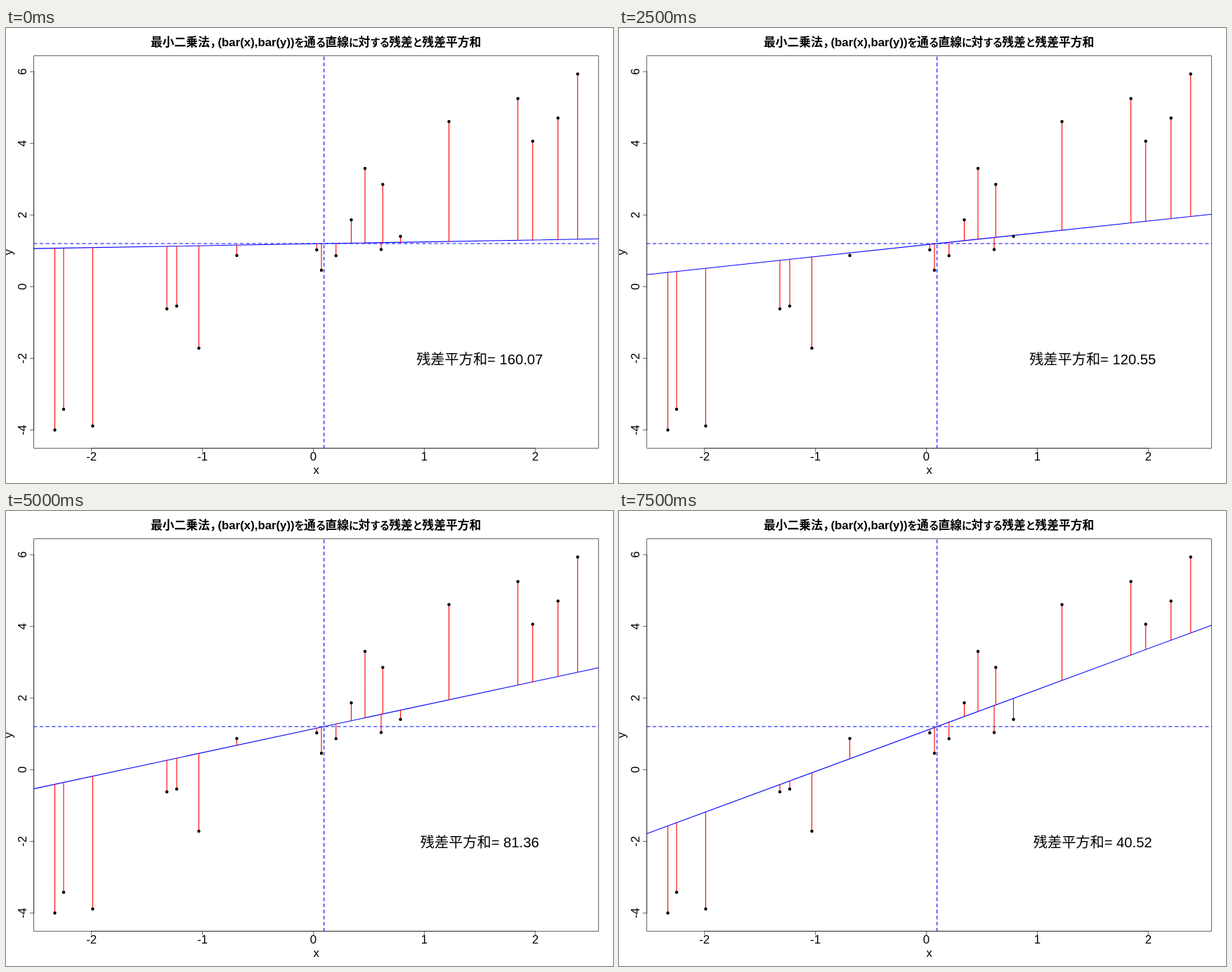
Animation of 864 by 648 pixels, one loop 8000 ms. Source, as an HTML page:

```html
<!DOCTYPE html>
<html lang="ja">
<head>
<meta charset="utf-8">
<style>
  html, body { margin: 0; width: 100%; height: 100%; overflow: hidden; background: #fff; }
  svg { display: block; }
  text { font: 16.8px "Liberation Sans", "Noto Sans CJK JP", "Noto Sans CJK", sans-serif; text-anchor: middle; }
  path, rect { fill: none; stroke-width: 1.1; stroke-linecap: round; }
  #title { font-weight: bold; text-anchor: start; }
  #title .comma { letter-spacing: -5.2px; }
  #title .kana { font-size: 14.5px; letter-spacing: -1px; }
  #sum { font-size: 20.2px; }
  .axis { stroke: #000; stroke-width: .6; }
  #means { stroke: #00f; stroke-dasharray: 4.32; }
  #fit { stroke: #00f; }
  #residuals { stroke: #f00; }
</style>
</head>
<body>
<svg width="864" height="648" viewBox="0 0 864 648">
  <text id="title" x="206" y="26"></text>
  <rect class="axis" x="39.7" y="39.7" width="803.8" height="558.7"/>
  <path id="ticks" class="axis"/>
  <g id="labels"></g>
  <path id="means"/>
  <path id="fit"/>
  <path id="residuals"/>
  <path id="points" stroke="#000" style="stroke-width:4.5"/>
  <text id="sum" x="674.2" y="478.5"></text>
</svg>
<script>
const $ = id => document.getElementById(id);
const setPath = (id, d) => $(id).setAttribute('d', d);
const LEFT = 39.7, RIGHT = 843.5, TOP = 39.7, BOTTOM = 598.4;
const UNIT_X = 157.9, UNIT_Y = 51.04;
const px = x => 437.5 + UNIT_X * x;
const py = y => 368.4 - UNIT_Y * y;

// The observed sample; the means, residuals and fitted line follow from it.
const points = [
  [69.5, 572.6], [82, 543], [123.4, 566.7], [229, 400], [243, 396],
  [274.5, 456], [328.5, 324], [442.3, 316], [449, 345], [469.7, 324.3],
  [491.5, 273.3], [511, 200], [534, 315.5], [536.3, 222.7], [561.5, 296.8],
  [630.5, 133.3], [728.6, 100.5], [749.7, 161.2], [785.7, 128.3], [813.7, 65.6]
];
const [meanX, meanY] = [0, 1].map(i => points.reduce((sum, p) => sum + p[i], 0) / points.length);

// Proportional kana are narrower than the kanji around them.
$('title').innerHTML = '最小二乗法，(bar(x),bar(y))を通る直線に対する残差と残差平方和'
  .replace(/，/, '<tspan class="comma">，</tspan>')
  .replace(/[ぁ-ん]+/g, '<tspan class="kana">$&</tspan>');

const label = (text, x, y, turn = 0) =>
  `<text transform="translate(${x} ${y}) rotate(${turn})">${text}</text>`;
let ticks = `M${px(-2)} ${BOTTOM}H${px(2)}M${LEFT} ${py(-4)}V${py(6)}`;
let labels = label('x', 441.6, 635) + label('y', 8.7, 319.3, -90);
for (let v = -2; v <= 2; v++) {
  ticks += `M${px(v)} ${BOTTOM}v5.4`;
  labels += label(v, px(v), 616);
}
for (let v = -4; v <= 6; v += 2) {
  ticks += `M${LEFT} ${py(v)}h-5.4`;
  labels += label(v, 28.7, py(v), -90);
}
setPath('ticks', ticks);
$('labels').innerHTML = labels;
setPath('means', `M${LEFT} ${meanY}H${RIGHT}M${meanX} ${BOTTOM}V${TOP}`);
setPath('points', points.map(([x, y]) => `M${x} ${y}h0`).join(''));

function draw(step) {
  const slope = Math.tan(Math.PI * (step + 1) / 59);
  const lineY = x => meanY - (x - meanX) * slope * UNIT_Y / UNIT_X;
  setPath('fit', `M${LEFT} ${lineY(LEFT)}L${RIGHT} ${lineY(RIGHT)}`);
  setPath('residuals', points.map(([x, y]) => `M${x} ${y}V${lineY(x)}`).join(''));
  // Sum of squares: Syy - 2 b Sxy + b² Sxx
  const sum = 168.3675 - 157.865 * slope + 40.2498 * slope ** 2;
  $('sum').textContent = '残差平方和= ' + +sum.toFixed(2);
}

let shown = -1;
function tick() {
  const step = Math.floor(performance.now() % 8000 / 500);
  if (step !== shown) draw(shown = step);
  requestAnimationFrame(tick);
}
tick();
</script>
</body>
</html>
```
